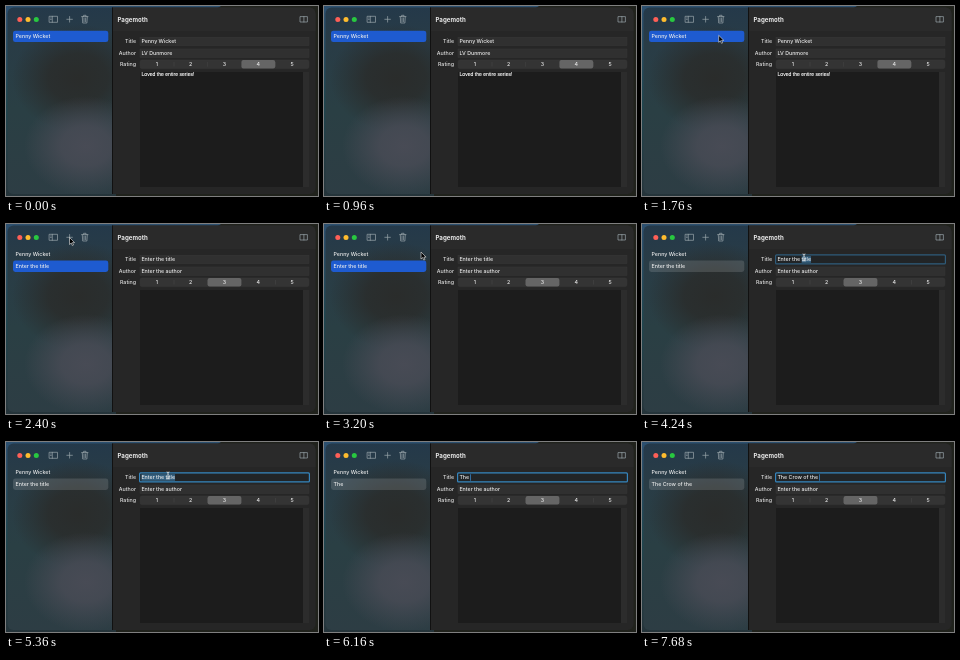
Recreate the animation shown at these times as an HTML page. Size 312x190 px, loop 8000 ms.

```html
<!DOCTYPE html>
<html lang="en">
<head>
<meta charset="utf-8">
<title>Book list</title>
<style>
html, body { margin: 0; width: 100%; height: 100%; overflow: hidden; background: #141d1f; }
svg { display: block; width: 100vw; height: 100vh; }
text { font: 500 5.3px Inter, sans-serif; fill: #ececec; white-space: pre; }
.head { font-weight: 700; font-size: 6.1px; }
.label { text-anchor: end; fill: #e0e0e0; }
.mid { text-anchor: middle; }
.note { font: 5.1px "Liberation Sans", sans-serif; fill: #fff; stroke: #fff; stroke-width: .12; }
.icon { fill: none; stroke: #9aa5ab; stroke-width: .7; stroke-linecap: round; stroke-linejoin: round; }
</style>
</head>
<body>
<svg viewBox="0 0 312 190" preserveAspectRatio="none">
  <defs>
    <linearGradient id="desk" x2="0" y2="1">
      <stop stop-color="#2c5070"/><stop offset=".5" stop-color="#1f4650"/><stop offset="1" stop-color="#25343a"/>
    </linearGradient>
    <linearGradient id="side" x2="0" y2="1">
      <stop stop-color="#24394a"/><stop offset=".2" stop-color="#293c46"/>
      <stop offset=".55" stop-color="#2a3f44"/><stop offset="1" stop-color="#2d3d44"/>
    </linearGradient>
    <radialGradient id="dark">
      <stop stop-color="#2a2c2b"/><stop offset=".45" stop-color="#2a2c2b" stop-opacity=".85"/>
      <stop offset="1" stop-color="#2a2c2b" stop-opacity="0"/>
    </radialGradient>
    <radialGradient id="haze">
      <stop stop-color="#484b55"/><stop offset=".4" stop-color="#484b55" stop-opacity=".85"/>
      <stop offset="1" stop-color="#484b55" stop-opacity="0"/>
    </radialGradient>
    <clipPath id="frame"><rect x="1.5" y="1.5" width="308" height="186.5" rx="6"/></clipPath>
  </defs>

  <rect width="312" height="190" fill="#20221c"/>
  <path d="M0 0h215l-5 3h-100v187h-110z" fill="url(#desk)"/>
  <g clip-path="url(#frame)">
    <rect width="107" height="190" fill="url(#side)"/>
    <g clip-path="inset(0)">
      <ellipse cx="72" cy="72" rx="66" ry="54" fill="url(#dark)"/>
      <ellipse cx="80" cy="140" rx="62" ry="50" fill="url(#haze)"/>
    </g>
    <rect x="106.5" width="204" height="190" fill="#262626"/>
    <rect x="106.5" width="204" height="25" fill="#2a2a2a"/>
    <rect x="106" width="1" height="190" fill="#111"/>
  </g>

  <circle cx="13.8" cy="13.5" r="2.5" fill="#fe5f57"/>
  <circle cx="22" cy="13.5" r="2.5" fill="#febc2e"/>
  <circle cx="30.3" cy="13.5" r="2.5" fill="#28c840"/>
  <g class="icon">
    <path d="M43.5 10.3h8v6h-8zM46.3 10.3v6M44.6 12h.6M44.6 13.5h.6"/>
    <path d="M60.8 13.3h5.6M63.6 10.5v5.6"/>
    <path d="M75.6 10.6h6.4M77.6 10.6v-1.3h2.4v1.3M76.3 10.8l.4 6.2h4.2l.4-6.2M78 12v3.6M79.6 12v3.6"/>
    <path d="M294.4 10.6h7v5.4h-7zM297.9 10.6v5.4"/>
  </g>
  <text class="head" x="111.5" y="15.7">Pagemoth</text>

  <rect id="row" x="7" width="95.3" height="11.4" rx="2.4"/>
  <text x="9.5" y="32.3">Penny Wicket</text>
  <text id="item" x="9.5" y="44.2"></text>

  <text class="label" x="130" y="37.4">Title</text>
  <text class="label" x="130" y="49.2">Author</text>
  <text class="label" x="130" y="60.2">Rating</text>
  <g fill="#303030" stroke="#3b3b3b" stroke-width=".4">
    <rect x="134" y="31.2" width="169" height="8.4"/>
    <rect x="134" y="43" width="169" height="8.4"/>
    <rect x="134" y="54" width="169" height="8.6" rx="2" fill="#343434"/>
  </g>
  <g id="focus">
    <rect x="134" y="31.2" width="169" height="8.4" fill="#212426"/>
    <rect id="ring" x="133.6" y="30.9" width="169.8" height="9" rx="1" fill="none" stroke="#3585bd" stroke-width="1.2"/>
    <rect id="mark" y="32.2" height="6.6" fill="#35607f"/>
    <rect id="caret" y="32.3" width=".7" height="6.4" fill="#3b8fd6"/>
  </g>
  <text id="title" x="135.4" y="37.4"></text>
  <text id="author" x="135.4" y="49.2"></text>
  <path d="M168 56v4.6M201.6 56v4.6M269.5 56v4.6" stroke="#484848" stroke-width=".5"/>
  <rect id="pick" y="54" width="33.8" height="8.6" rx="2" fill="#656565"/>
  <g id="digits"></g>
  <rect x="134" y="66" width="169" height="115" fill="#1c1c1c"/>
  <rect x="297" y="66" width="6" height="115" fill="#2c2c2c"/>
  <text id="note" class="note" x="135.5" y="70.2">Loved the entire series!</text>

  <path id="arrow" d="M0 0v7l1.7-1.5 1.1 2.5 1.2-.5-1.1-2.4h2.2z" fill="#000" stroke="#e8e8e8" stroke-width=".6"/>
  <path id="beam" d="M-1.4-3.6q1.4 0 1.4 1v5.2q0 1-1.4 1M1.4-3.6q-1.4 0-1.4 1M0 2.6q0 1 1.4 1" fill="none" stroke="#eee" stroke-width=".8"/>
</svg>
<script>
const $ = id => document.getElementById(id);
const show = (id, on) => $(id).style.display = on ? '' : 'none';
const set = (id, attrs) => { for (const k in attrs) $(id).setAttribute(k, attrs[k]); };
const DURATION = 8000, ADD = 2320, FOCUS = 4120, WORD = 4200, ALL = 4320, TYPE = 5840;
const typed = 'The Crow of the ';
// Pointer stops: time, x, y
const stops = [[1360, 106, 62], [1760, 76.7, 29.3], [2160, 63.5, 13.5], [2400, 63.5, 13.5],
  [2880, 97, 28], [3200, 97, 28], [4000, 162, 33.6], [TYPE, 162, 33.6]];

$('digits').innerHTML = [1, 2, 3, 4, 5].map(n =>
  `<text class="mid" x="${117.1 + 33.8 * n}" y="60.2">${n}</text>`).join('');

function pointer(t) {
  const i = stops.findIndex(s => s[0] > t);
  if (i < 1) return null;
  const [t0, x0, y0] = stops[i - 1], [t1, x1, y1] = stops[i];
  const u = (t - t0) / (t1 - t0), e = u * u * (3 - 2 * u);
  return [x0 + (x1 - x0) * e, y0 + (y1 - y0) * e];
}

function typedCount(t) {
  if (t < 6320) return Math.min(4, 1 + Math.floor((t - TYPE) / 80));
  return Math.min(typed.length, 5 + Math.floor((t - 6320) / 112));
}

function draw(t) {
  const added = t >= ADD, focused = t >= FOCUS, typing = t >= TYPE;
  const title = !added ? 'Penny Wicket' : typing ? typed.slice(0, typedCount(t)) : 'Enter the title';
  $('title').textContent = title;
  $('item').textContent = added ? title : '';
  $('author').textContent = added ? 'Enter the author' : 'LV Dunmore';
  show('note', !added);
  set('pick', { x: 134 + 33.8 * (added ? 2 : 3) });
  set('row', { y: added ? 36.6 : 24.7, fill: focused ? '#ffffff22' : '#1e5bd0' });

  show('focus', focused);
  if (focused) {
    const width = n => n ? $('title').getSubStringLength(0, n) : 0;
    const selected = t >= WORD && !typing;
    const from = t < ALL ? width(10) : 0, end = width(title.length);
    show('mark', selected);
    show('caret', !selected);
    set('ring', { opacity: Math.min(1, (t - FOCUS) / 220) });
    set('mark', { x: 135.4 + from, width: end - from });
    set('caret', { x: 135.1 + end });
  }

  const p = pointer(t), inField = p && p[0] > 134 && p[1] > 30;
  show('arrow', p && !inField);
  show('beam', inField);
  if (p) set(inField ? 'beam' : 'arrow', { transform: `translate(${p})` });
}

const start = performance.now();
function tick() {
  draw((performance.now() - start) % DURATION);
  requestAnimationFrame(tick);
}
tick();
</script>
</body>
</html>
```
